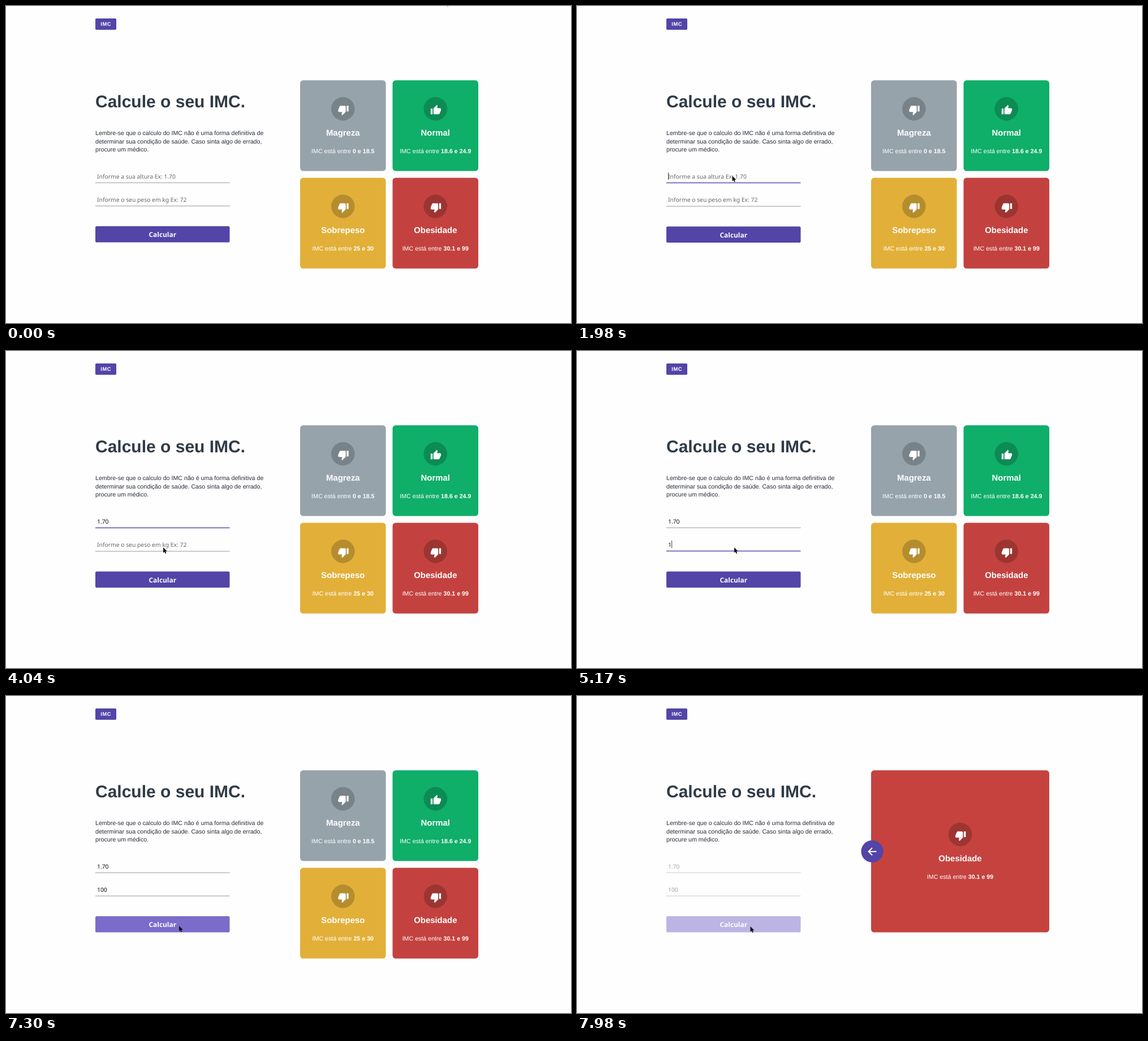
An HTML page that plays this animation: 999x560 px, repeating every 8000 ms.

```html
<!DOCTYPE html>
<html lang="pt">
<head>
<meta charset="utf-8">
<style>
html, body { margin: 0; width: 100%; height: 100%; overflow: hidden; background: #fefefe; }
svg { display: block; width: 999px; height: 560px; }
text { font-family: "Liberation Sans", Arial, sans-serif; font-size: 10.67px; fill: #2a2d3a; text-rendering: geometricPrecision; white-space: pre; }
.bold, tspan { font-weight: bold; }
.ui { font-family: "Noto Sans", "Open Sans", sans-serif; font-size: 10.35px; }
.mid { text-anchor: middle; }
.white, .card text { fill: #fff; }
</style>
</head>
<body>
<svg viewBox="0 0 999 560">
  <rect x="158" y="22" width="37" height="20" rx="1.8" fill="#5344a8"/>
  <text class="bold white mid" x="176.7" y="35.4" style="font-size:9.4px;letter-spacing:.5px">IMC</text>
  <text class="bold" x="158" y="179" style="font-size:30px;fill:#2f3b47">Calcule o seu IMC.</text>
  <text x="158" y="227.6">Lembre-se que o calculo do IMC não é uma forma definitiva de</text>
  <text x="158" y="242.5">determinar sua condição de saúde. Caso sinta algo de errado,</text>
  <text x="158" y="257.4">procure um médico.</text>
  <g id="fields"></g>
  <g id="button">
    <rect id="face" x="158" y="389" width="237.5" height="28.5" rx="2.6"/>
    <text class="ui bold white mid" x="276.8" y="408" style="font-size:11.9px">Calcular</text>
  </g>
  <g id="grid"></g>
  <g id="result"></g>
  <path id="mouse" fill="#111" d="M0 0V9.6L2.2 7.7 3.7 11 5.4 10.3 4 7.1H7Z"/>
</svg>
<script>
const $ = id => document.getElementById(id);
const LOOP = 8000, BLINK = 480;
const clamp = v => Math.max(0, Math.min(1, v));
const ramp = (t, start, length) => clamp((t - start) / length);
const mix = (a, b, k) => `rgb(${a.map((v, i) => v + (b[i] - v) * k)})`;

const THUMB_DOWN = "M15 3H6c-.83 0-1.54.5-1.84 1.22l-3.02 7.05c-.09.23-.14.47-.14.73v2c0 1.1.9 2 2 2h6.31l-.95 4.57-.03.32c0 .41.17.79.44 1.06L9.83 23l6.59-6.59c.36-.36.58-.86.58-1.41V5c0-1.1-.9-2-2-2zm4 0v12h4V3h-4z";
const THUMB_UP = "M1 21h4V9H1v12zm22-11c0-1.1-.9-2-2-2h-6.31l.95-4.57.03-.32c0-.41-.17-.79-.44-1.06L14.17 1 7.59 7.59C7.22 7.95 7 8.45 7 9v10c0 1.1.9 2 2 2h9c.83 0 1.54-.5 1.84-1.22l3.02-7.05c.09-.23.14-.47.14-.73v-2z";

function card(x, y, w, h, color, title, range, icon = THUMB_DOWN) {
  return `<g class="card" transform="translate(${x} ${y})">
    <rect width="${w}" height="${h}" rx="5.5" fill="${color}"/>
    <g transform="translate(${w / 2} ${h / 2 - 80})">
      <circle cy="50.2" r="20.8" fill="#000" fill-opacity=".2"/>
      <path d="${icon}" fill="#fff" transform="translate(-9.3 42.4) scale(.833)"/>
      <text class="bold mid" y="97.3" style="font-size:14.93px">${title}</text>
      <text class="mid" y="128.2">IMC está entre <tspan>${range}</tspan></text>
    </g></g>`;
}

$("grid").innerHTML =
  card(520, 131.3, 151.6, 160.3, "#96a3ab", "Magreza", "0 e 18.5") +
  card(683.5, 131.3, 151.6, 160.3, "#0fae69", "Normal", "18.6 e 24.9", THUMB_UP) +
  card(520, 303.5, 151.6, 160.3, "#e2b039", "Sobrepeso", "25 e 30") +
  card(683.5, 303.5, 151.6, 160.3, "#c3423f", "Obesidade", "30.1 e 99");
$("result").innerHTML =
  card(520, 131.3, 315, 286.2, "#c5423f", "Obesidade", "30.1 e 99") +
  `<circle cx="522" cy="274.5" r="19.6" fill="#5344a8"/>
   <path d="M529.5 274.7H516M522 268.2L515.6 274.7 522 281.2" fill="none" stroke="#fff" stroke-width="2.1"/>`;

// keys: time of each typed character
const fields = [
  { y: 312, hint: "Informe a sua altura Ex: 1.70", value: "1.70", keys: [2450, 2680, 3000, 3200], focus: 1600, blur: 4150 },
  { y: 353, hint: "Informe o seu peso em kg Ex: 72", value: "100", keys: [5060, 5230, 5340], focus: 4150, blur: 7200 }
];
for (const f of fields) {
  f.group = document.createElementNS("http://www.w3.org/2000/svg", "g");
  f.group.innerHTML = `<text class="ui" x="161" y="${f.y - 7.4}"></text>
    <rect x="158" y="${f.y - .3}" width="237.5"/>
    <rect y="${f.y - 18}" width=".9" height="13" fill="#222"/>`;
  [f.text, f.line, f.caret] = f.group.children;
  $("fields").append(f.group);
}

// time, x, y of the pointer tip
const path = [
  [390, 777, -10.2], [1190, 274, 294], [1260, 274, 295], [1360, 273.5, 298], [1500, 274.5, 300],
  [3580, 274.5, 300], [4050, 278, 347], [5400, 278, 347], [6140, 293, 382], [6310, 293, 402],
  [6650, 304, 409], [7000, 306, 406], [7930, 306, 406], [7980, 306.5, 407]
];

function pointer(t) {
  const i = path.findIndex(p => p[0] > t);
  if (i === 0) return path[0].slice(1);
  if (i < 0) return path[path.length - 1].slice(1);
  const a = path[i - 1], b = path[i];
  let k = (t - a[0]) / (b[0] - a[0]);
  k = k * k * (3 - 2 * k);
  return [a[1] + (b[1] - a[1]) * k, a[2] + (b[2] - a[2]) * k];
}

function draw(t) {
  const fade = ramp(t, 7360, 200);
  let shift = 0;
  for (const f of fields) {
    const typed = f.keys.filter(k => k <= t).length;
    const focused = t >= f.focus && t < f.blur;
    const last = typed ? f.keys[typed - 1] : f.focus;
    f.group.setAttribute("transform", `translate(0 ${shift})`);
    f.text.textContent = typed ? f.value.slice(0, typed) : f.hint;
    f.text.style.fill = typed ? "#111" : "#686868";
    f.text.setAttribute("opacity", 1 - .63 * fade);
    f.line.setAttribute("height", focused ? 1.4 : 1);
    f.line.setAttribute("fill", focused ? "#5344a8" : "#999");
    f.line.setAttribute("opacity", 1 - .5 * fade);
    const width = typed ? f.text.getComputedTextLength() : 0;
    f.caret.setAttribute("x", 161.3 + width);
    f.caret.setAttribute("visibility", focused && (t - last) % (2 * BLINK) < BLINK ? "visible" : "hidden");
    if (focused) shift = .6;
  }
  $("button").setAttribute("transform", `translate(0 ${shift})`);
  $("button").setAttribute("opacity", 1 - .5 * fade);
  $("face").setAttribute("fill", mix([83, 68, 168], [124, 108, 202], ramp(t, 6210, 210)));
  const done = t >= 7330;
  $("grid").style.display = done ? "none" : "";
  $("result").style.display = done ? "" : "none";
  $("mouse").setAttribute("transform", `translate(${pointer(t)})`);
}

const start = performance.now();
function tick(now) {
  draw(Math.max(0, now - start) % LOOP);
  requestAnimationFrame(tick);
}
draw(0);
requestAnimationFrame(tick);
</script>
</body>
</html>
```
